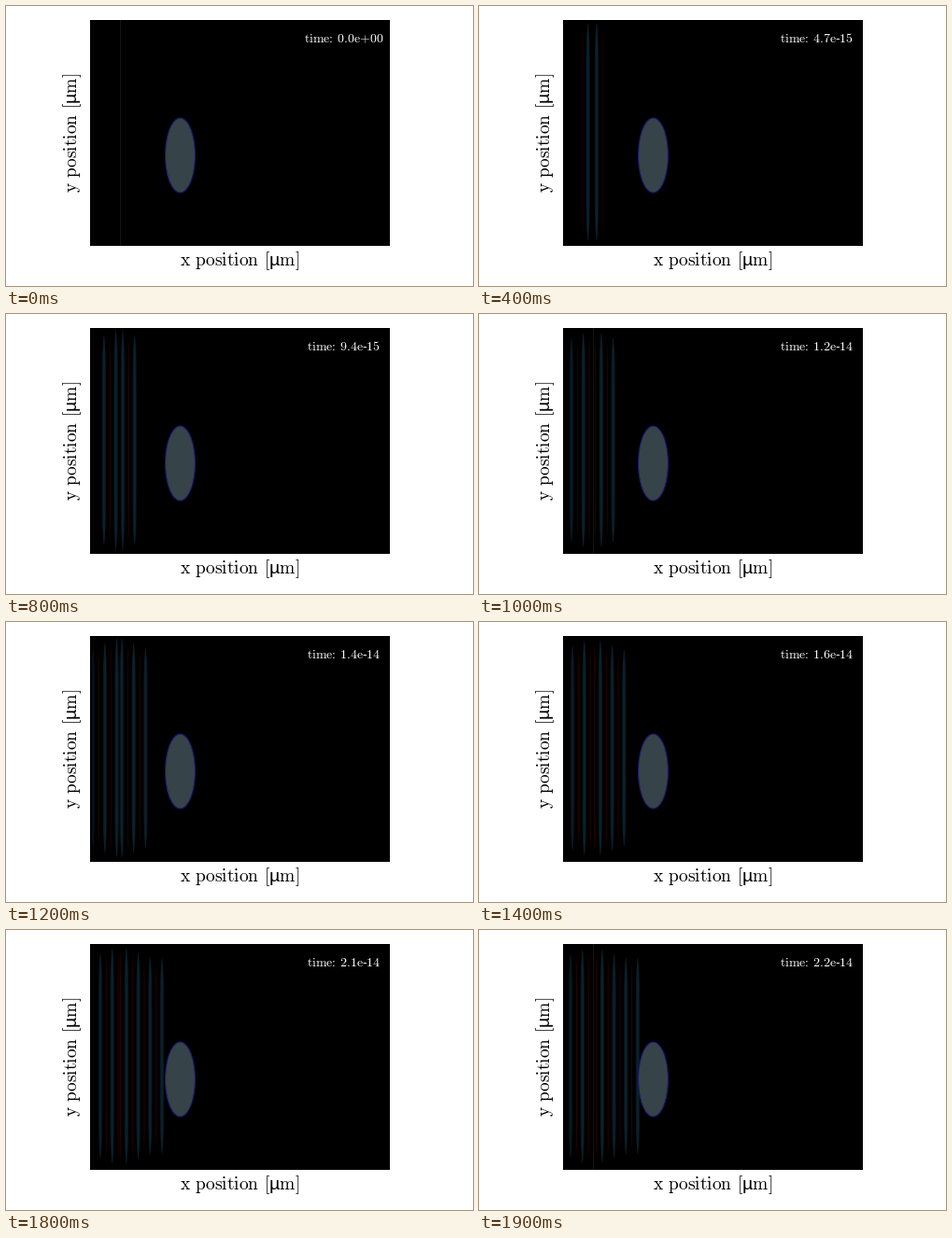
These frames come from a looping animation (500x300 px, 2 s). A matplotlib script:

```python
import numpy as np
import matplotlib.pyplot as plt
from matplotlib.animation import FuncAnimation
from matplotlib.collections import PolyCollection
from matplotlib.patches import Ellipse, Rectangle

W, H, DPI = 500, 300, 100
FRAMES, STEP_MS = 20, 100
DT = 1.175e-15            # simulated seconds per frame

SRC_X, MID_Y = 121.3, 135.0
SPEED, START = 2.93, 2.4  # px per frame, frame at which the first crest leaves
WAVELENGTH = 12.7
ABSORB_X = 92             # left edge of the visible field

BLUE_RIM = np.array([7, 20, 27]) / 255
BLUE_CORE = np.array([11, 32, 42]) / 255
RED = np.array([36, 2, 4]) / 255

plt.rcParams["mathtext.fontset"] = "cm"
plt.rcParams["font.family"] = "Liberation Sans"

fig = plt.figure(figsize=(W / DPI, H / DPI), dpi=DPI, facecolor="white")
ax = fig.add_axes([0, 0, 1, 1])
ax.set_xlim(0, W)
ax.set_ylim(H, 0)
ax.axis("off")

panel = Rectangle((90, 15), 321, 242, fc="black", ec="none", zorder=0)
ax.add_patch(panel)
source, = ax.plot([121.5, 121.5], [15, 256], color="#141414",
                  lw=0.72, zorder=1)
waves = PolyCollection([], edgecolors="none", zorder=2)
ax.add_collection(waves)
waves.set_clip_path(Rectangle((ABSORB_X, 16), 318, 240,
                              transform=ax.transData))
ax.add_patch(Ellipse((186.5, 160), 32, 80, fc="#364348", ec="#17176e",
                     lw=0.8, zorder=3))


def label(x, y, name, **kw):
    text = r"$\text{%s position [}\mathregular{µ}\text{m]}$" % name
    ax.text(x, y, text, size=14, ha="center", va="baseline",
            rotation_mode="anchor", **kw)


label(250.5, 278.5, "x")
label(76, 135.5, "y", rotation=90)
clock = ax.text(362, 39, "", size=10, color="white",
                ha="center", va="baseline", zorder=4)


def clock_text(t):
    mantissa, exponent = f"{t:.1e}".split("e")
    if exponent[0] == "+":
        return r"$\text{time: %se%s}$" % (mantissa, exponent)
    return (r"$\text{time: %se}\mathregular{%s}\text{%s}$"
            % (mantissa, "\u2010", exponent[1:]))


U = np.sin(np.linspace(-np.pi / 2, np.pi / 2, 41))


def strip(x, half_w, half_h):
    """Tall thin band with tapered ends."""
    w = half_w * np.sqrt(1 - np.abs(U) ** 8)
    y = MID_Y + half_h * U
    right = np.column_stack([x + w, y])
    left = np.column_stack([x - w, y])
    return np.vstack([right, left[::-1]])


def half_height(d):
    return max(105, 118.5 - 0.4 * d)


def strength(x):
    return np.clip(0.45 + (x - ABSORB_X) / 20, 0.45, 1)


def field(n):
    lead = SPEED * (n - START)
    reds, blues = [], []
    for k in range(6):
        for side in (-1, 1):
            d = lead - k * WAVELENGTH
            x = SRC_X + side * d
            if d > 0 and x > ABSORB_X - 1:
                h, a = half_height(d), strength(x)
                blues.append((strip(x, 2.2, h * 0.93), BLUE_RIM * a))
                blues.append((strip(x, 1.3, h), BLUE_CORE * a))
            # opposite half cycle, half a wavelength ahead
            d += WAVELENGTH / 2
            x = SRC_X + side * d
            fading = k == 0 and d > 12.5
            if d > 0 and x > ABSORB_X + 4 and not fading:
                a = strength(x) * (0.7 if k == 0 else 1)
                reds.append((strip(x, 0.6, half_height(d) - 8), RED * a))
    return reds + blues


def draw(n):
    bands = field(n)
    waves.set_verts([verts for verts, _ in bands])
    waves.set_facecolor([color for _, color in bands] or "none")
    phase = n * SPEED / WAVELENGTH % 1
    source.set_visible(n == 0 or 0.3 < phase < 0.6)
    clock.set_text(clock_text(n * DT))
    return waves, source, clock


anim = FuncAnimation(fig, draw, frames=FRAMES, interval=STEP_MS,
                     repeat=True, repeat_delay=0, blit=False)
plt.show()
```
